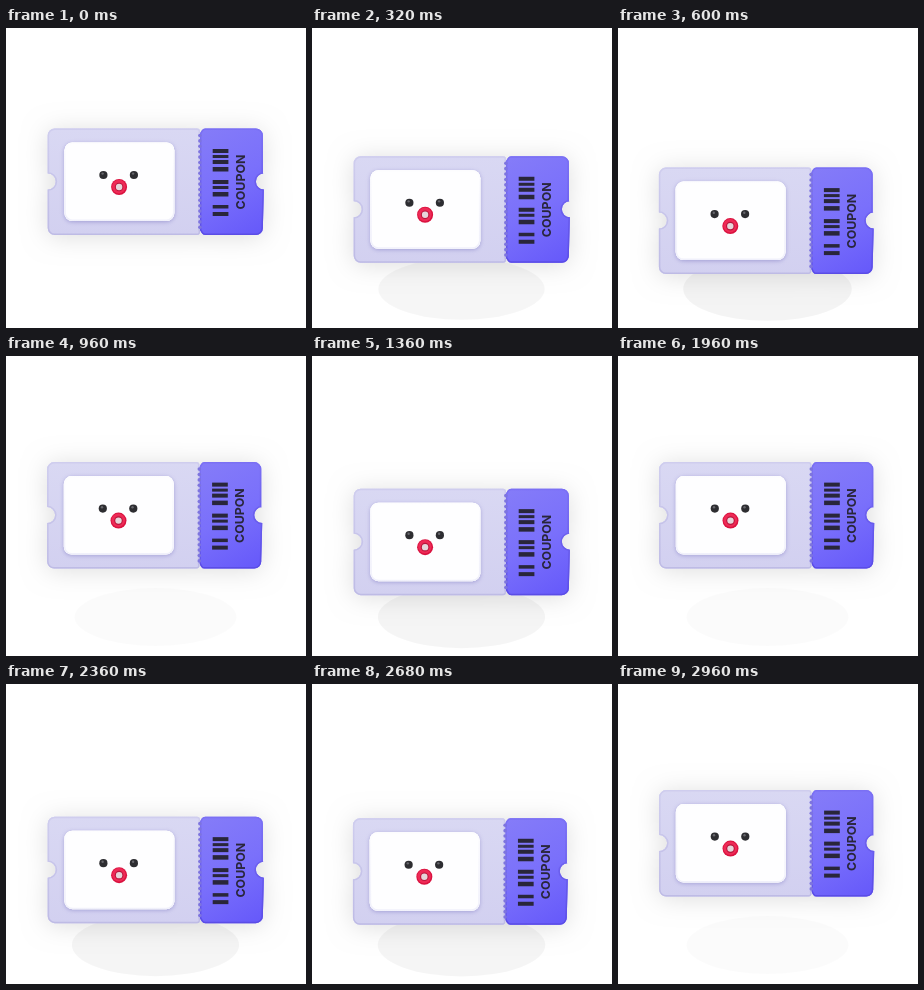
Recreate the animation shown at these times as an HTML page with a canvas. Size 300 by 300 pixels, loop 3 s.

```html
<!DOCTYPE html>
<html lang="en">
<head>
<meta charset="utf-8">
<title>Bouncing coupon</title>
<style>
  html, body { margin: 0; width: 100%; height: 100%; overflow: hidden; background: #fff; }
  canvas { display: block; width: 300px; height: 300px; }
</style>
</head>
<body>
<canvas id="stage"></canvas>
<script>
const canvas = document.getElementById('stage');
const ctx = canvas.getContext('2d');
const ratio = window.devicePixelRatio || 1;
canvas.width = canvas.height = 300 * ratio;

const STEP = 40, BOUNCE = 1000, DROP = 41;
const TOP = 100.5, BOTTOM = 207, MID = 153.5, SEAM = 193.5;

// Eased fall, then a slightly slower rise that is cut short by the next fall.
function drop(p) {
  const x = p < 0.52 ? p / 0.52 : 1 - (p - 0.52) / 0.58;
  return DROP * (1 - Math.cos(Math.PI * x)) / 2;
}

// Slight turn of the ticket: 1 while falling, -1 on landing, easing back after.
function turn(p) {
  if (p < 0.4) return 1;
  if (p < 0.6) return 1 - (p - 0.4) * 10;
  return -1 + (p - 0.6) * 1.4;
}

function vertical(a, b) {
  const g = ctx.createLinearGradient(0, TOP, 0, BOTTOM);
  g.addColorStop(0, a);
  g.addColorStop(1, b);
  return g;
}

function stubPath(right) {
  const p = new Path2D();
  p.moveTo(SEAM, TOP + 5);
  p.arcTo(SEAM + 3, TOP, SEAM + 9, TOP, 4);
  p.arcTo(right, TOP, right, TOP + 9, 7);
  p.lineTo(right, MID - 8);
  p.arc(right + 1, MID, 8, -Math.PI / 2, Math.PI / 2, true);
  p.lineTo(right, BOTTOM - 9);
  p.arcTo(right, BOTTOM, right - 9, BOTTOM, 7);
  p.arcTo(SEAM + 3, BOTTOM, SEAM, BOTTOM - 5, 4);
  p.lineTo(SEAM, BOTTOM - 5);
  p.closePath();
  return p;
}

function bodyPath() {
  const left = 41.3, p = new Path2D();
  p.moveTo(left + 8, TOP);
  p.lineTo(SEAM - 3, TOP);
  p.quadraticCurveTo(SEAM + 1, TOP, SEAM, TOP + 5);
  p.lineTo(SEAM, BOTTOM - 5);
  p.quadraticCurveTo(SEAM + 1, BOTTOM, SEAM - 3, BOTTOM);
  p.arcTo(left, BOTTOM, left, BOTTOM - 9, 7);
  p.lineTo(left, MID + 8);
  p.arc(left, MID, 8, Math.PI / 2, -Math.PI / 2, true);
  p.arcTo(left, TOP, left + 9, TOP, 7);
  p.closePath();
  return p;
}

function slab(path, fill, light, dark) {
  ctx.fillStyle = fill;
  ctx.fill(path);
  ctx.save();
  ctx.clip(path);
  ctx.lineWidth = 3;
  ctx.strokeStyle = vertical(light, dark);
  ctx.stroke(path);
  ctx.restore();
}

function disc(x, y, r, color) {
  ctx.fillStyle = color;
  ctx.beginPath();
  ctx.arc(x, y, r, 0, Math.PI * 2);
  ctx.fill();
}

function roundBox(x, y, w, h, r) {
  const p = new Path2D();
  p.roundRect(x, y, w, h, r);
  return p;
}

function withShadow(color, blur, dy, paint) {
  ctx.save();
  ctx.shadowColor = color;
  ctx.shadowBlur = blur * ratio;
  ctx.shadowOffsetY = dy * ratio;
  paint();
  ctx.restore();
}

function drawFloor(y) {
  const k = y / DROP;
  ctx.fillStyle = `rgba(0,0,0,${0.043 * Math.sqrt(k)})`;
  ctx.beginPath();
  ctx.ellipse(149.5, 261, 80.5 + 4 * k, 28.5 + 3.5 * k, 0, 0, Math.PI * 2);
  ctx.fill();
}

function drawFace() {
  const card = roundBox(58, 114.5, 110, 78.5, 8);
  withShadow('rgba(120,115,190,.55)', 4, 1, () => {
    ctx.fillStyle = '#fff';
    ctx.fill(card);
  });
  slab(card, '#fefeff', '#ffffff', '#eeeefa');

  for (const x of [97, 127.5]) {
    disc(x, 147, 4.1, '#2d2d31');
    disc(x - 0.8, 145.6, 1.2, '#66666c');
  }

  disc(112.7, 159, 8, '#d9123f');
  disc(112.5, 158.6, 6.8, '#ee2a56');
  disc(112.7, 159, 4.3, '#b8173c');
  disc(112.7, 159, 3.2, '#e6d5da');
}

function drawStub(right) {
  const path = stubPath(right);
  const fill = ctx.createLinearGradient(SEAM, TOP, right, BOTTOM);
  fill.addColorStop(0, '#857cf8');
  fill.addColorStop(0.5, '#7a70fb');
  fill.addColorStop(1, '#6558fa');
  slab(path, fill, '#7b70f4', '#5a4ce6');

  ctx.fillStyle = '#29263a';
  const bars = [[121, 4], [127, 3], [132, 4], [139, 4.5], [152, 4], [158, 3], [164, 4.5], [177, 3.5], [184, 4]];
  for (const [y, h] of bars) ctx.fillRect(206.3, y, 15.7, h);

  ctx.save();
  ctx.translate(234, 154);
  ctx.rotate(-Math.PI / 2);
  ctx.font = '700 12.4px Inter, "Liberation Sans", sans-serif';
  ctx.textAlign = 'center';
  ctx.textBaseline = 'alphabetic';
  ctx.fillText('COUPON', 0, 4.5);
  ctx.restore();
}

function draw(time) {
  const p = (Math.floor(time / STEP) * STEP % BOUNCE) / BOUNCE;
  const y = drop(p), k = turn(p);
  const right = 255.8 + 0.7 * k;

  ctx.setTransform(ratio, 0, 0, ratio, 0, 0);
  ctx.fillStyle = '#fff';
  ctx.fillRect(0, 0, 300, 300);
  drawFloor(y);

  ctx.translate(0.4 * k, y);
  const body = bodyPath();
  const whole = new Path2D(body);
  whole.addPath(stubPath(right));
  withShadow('rgba(0,0,0,.13)', 24, 2, () => {
    ctx.fillStyle = '#d5d4f0';
    ctx.fill(whole);
  });

  drawStub(right);
  slab(body, vertical('#d9d8f3', '#d2d0f0'), '#cfcdee', '#bebbe5');
  for (let d = TOP + 7; d < BOTTOM - 4; d += 5.4) disc(SEAM, d, 1.8, '#7d74df');
  drawFace();
}

function tick(now) {
  draw(now);
  requestAnimationFrame(tick);
}
draw(0);
requestAnimationFrame(tick);
</script>
</body>
</html>
```
